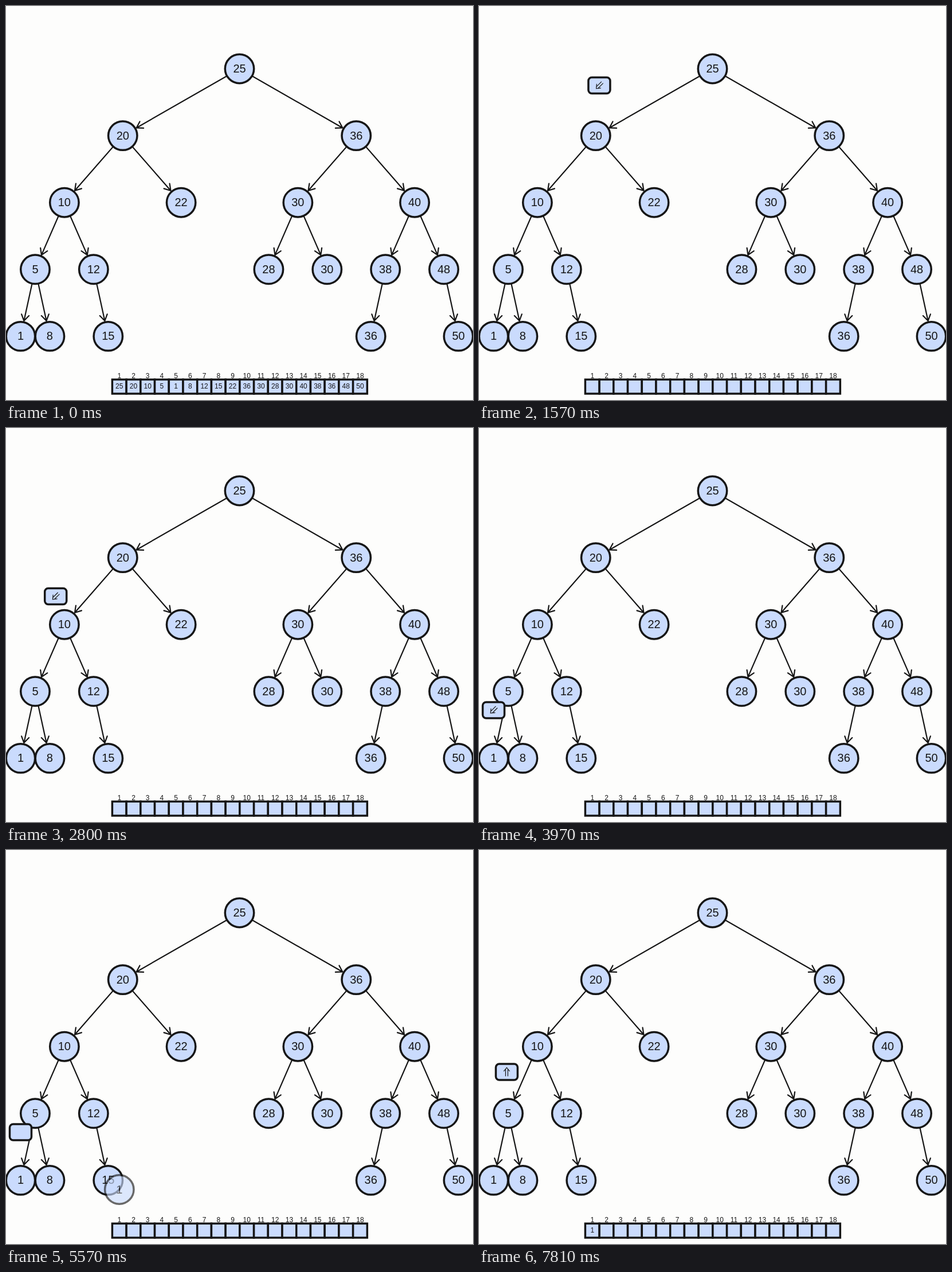
Animation, 815 px wide and 687 px high, one loop 8 s. Source, as an HTML page:

```html
<!DOCTYPE html>
<html lang="en">
<head>
<meta charset="utf-8">
<title>In-order traversal</title>
<style>
  html, body { margin: 0; width: 100%; height: 100%; overflow: hidden; background: #fdfdfc; }
  svg { display: block; width: 815px; height: 687px; }
  text { font: 20px "Liberation Sans", Arial, sans-serif; fill: #161616; text-anchor: middle; }
  .small { font-size: 12px; }
  .shape { fill: #cadbfd; stroke: #161616; stroke-width: 3.5; }
  .edge { fill: none; stroke: #161616; stroke-width: 2.2; stroke-linecap: round; }
  .sign { fill: none; stroke: #161616; stroke-width: 1.2; }
</style>
</head>
<body>
<svg id="stage" viewBox="0 0 815 687"></svg>
<script>
const LOOP = 8000, TICK = 100 / 3, MOVE = 530;
const WIDTH = 815, TOP = 109.5, LEVEL = 116.6, RADIUS = 25.2;
const CELL = 24.72, ROW_X = 185.4, ROW_Y = 651.3;

// [value, left, right]
const TREE = [25,
  [20, [10, [5, [1], [8]], [12, null, [15]]], [22]],
  [36, [30, [28], [30]], [40, [38, [36]], [48, null, [50]]]]];

const stage = document.getElementById('stage');

function add(parent, tag, attrs = {}, text = '') {
  const el = document.createElementNS('http://www.w3.org/2000/svg', tag);
  for (const key in attrs) el.setAttribute(key, attrs[key]);
  el.textContent = text;
  parent.append(el);
  return el;
}

const edges = add(stage, 'g'), nodes = add(stage, 'g'), row = add(stage, 'g');
const spot = (depth, i) => [WIDTH * (2 * i + 1) / 2 ** (depth + 1), TOP + LEVEL * depth];
const place = (el, [x, y]) => el.setAttribute('transform', `translate(${x} ${y})`);

function drawNode(parent, value, pos) {
  const g = add(parent, 'g');
  add(g, 'circle', { r: RADIUS, class: 'shape' });
  add(g, 'text', { y: 6.5 }, value);
  place(g, pos);
  return g;
}

function drawEdge([ax, ay], [bx, by]) {
  const angle = Math.atan2(by - ay, bx - ax);
  const x = bx - 27.5 * Math.cos(angle), y = by - 27.5 * Math.sin(angle);
  const arm = turn => `${x - 12.5 * Math.cos(angle + turn)} ${y - 12.5 * Math.sin(angle + turn)}`;
  add(edges, 'path', { class: 'edge', d: `M${ax} ${ay}L${x} ${y}M${arm(0.56)}L${x} ${y}L${arm(-0.56)}` });
}

const preorder = [];
function drawTree([value, left, right], depth = 0, i = 0) {
  const pos = spot(depth, i);
  preorder.push(value);
  drawNode(nodes, value, pos);
  [left, right].forEach((child, side) => {
    if (!child) return;
    drawEdge(pos, spot(depth + 1, 2 * i + side));
    drawTree(child, depth + 1, 2 * i + side);
  });
}
drawTree(TREE);

const cellX = i => ROW_X + CELL * (i + 0.5);
const cellText = (parent, i, value) => add(parent, 'text', { x: cellX(i), y: 667.2, class: 'small' }, value);

preorder.forEach((_, i) => {
  add(row, 'rect', { x: ROW_X + CELL * i, y: ROW_Y, width: CELL, height: 24.7, class: 'shape' });
  add(row, 'text', { x: cellX(i), y: 648.6, class: 'small' }, i + 1);
});
const oldValues = add(row, 'g');
preorder.forEach((value, i) => cellText(oldValues, i, value));
const output = cellText(row, 0, 1);

const copyFrom = spot(4, 0), copyTo = [cellX(0), 592];
const copy = drawNode(stage, 1, copyFrom);

const pointer = add(stage, 'g');
add(pointer, 'rect', { x: -19, y: -14, width: 38, height: 28, rx: 6, class: 'shape' });
const sign = turn => add(pointer, 'path', {
  class: 'sign', transform: `rotate(${turn})`,
  d: 'M-2 7.5V-4.5M2 7.5V-4.5M-5.2 -1.2L0 -7.5L5.2 -1.2'
});
const downLeft = sign(-135), downRight = sign(135), up = sign(0);

// Pointer hops: [depth from, depth to, start, first seen, last seen, settled]
const HOPS = [
  [0, 1, 1144, 1170, 1570, 1800],
  [1, 2, 1890, 2000, 2340, 2700],
  [2, 3, 2577, 2700, 2940, 3370],
  [3, 4, 3240, 3370, 3600, 3900],
  [4, 3, 7435, 7570, 7810, 8200]
];

const snap = (t, a, b) => t >= b ? b : Math.max(a, Math.floor(t / TICK + 0.02) * TICK);
const ease = p => p <= 0 ? 0 : p >= 1 ? 1 : p < 0.5 ? 4 * p ** 3 : 1 - 4 * (1 - p) ** 3;
const mix = (a, b, p) => a.map((v, i) => v + (b[i] - v) * p);
const fade = (t, a, b) => t < a ? 0 : (snap(t, a, b) - a + TICK) / (b - a + TICK);
const show = (el, opacity) => el.setAttribute('opacity', opacity);
const perch = depth => mix(spot(depth, 0), [0, 0], 0).map((v, i) => v - 84 * i);

function pointerAt(t) {
  let pos = perch(0);
  for (const [from, to, start, a, b, settled] of HOPS) {
    if (t < a) break;
    const p = t >= settled ? 1 : ease((snap(t, a, b) - start) / MOVE);
    pos = mix(perch(from), perch(to), p);
  }
  return pos;
}

function render(t) {
  show(oldValues, 1 - fade(t, 30, 270));
  show(pointer, fade(t, 700, 800));
  place(pointer, pointerAt(t));
  show(downLeft, 1 - fade(t, 4440, 4500));
  show(downRight, fade(t, 6540, 6640) - fade(t, 7070, 7140));
  show(up, fade(t, 7070, 7140));
  show(copy, t < 4970 ? 0 : 1 - fade(t, 5500, 5740));
  place(copy, mix(copyFrom, copyTo, ease((snap(t, 4970, 5460) - 4922) / MOVE)));
  show(output, fade(t, 6040, 6170));
}

function frame() {
  render(performance.now() % LOOP);
  requestAnimationFrame(frame);
}
frame();
</script>
</body>
</html>
```
